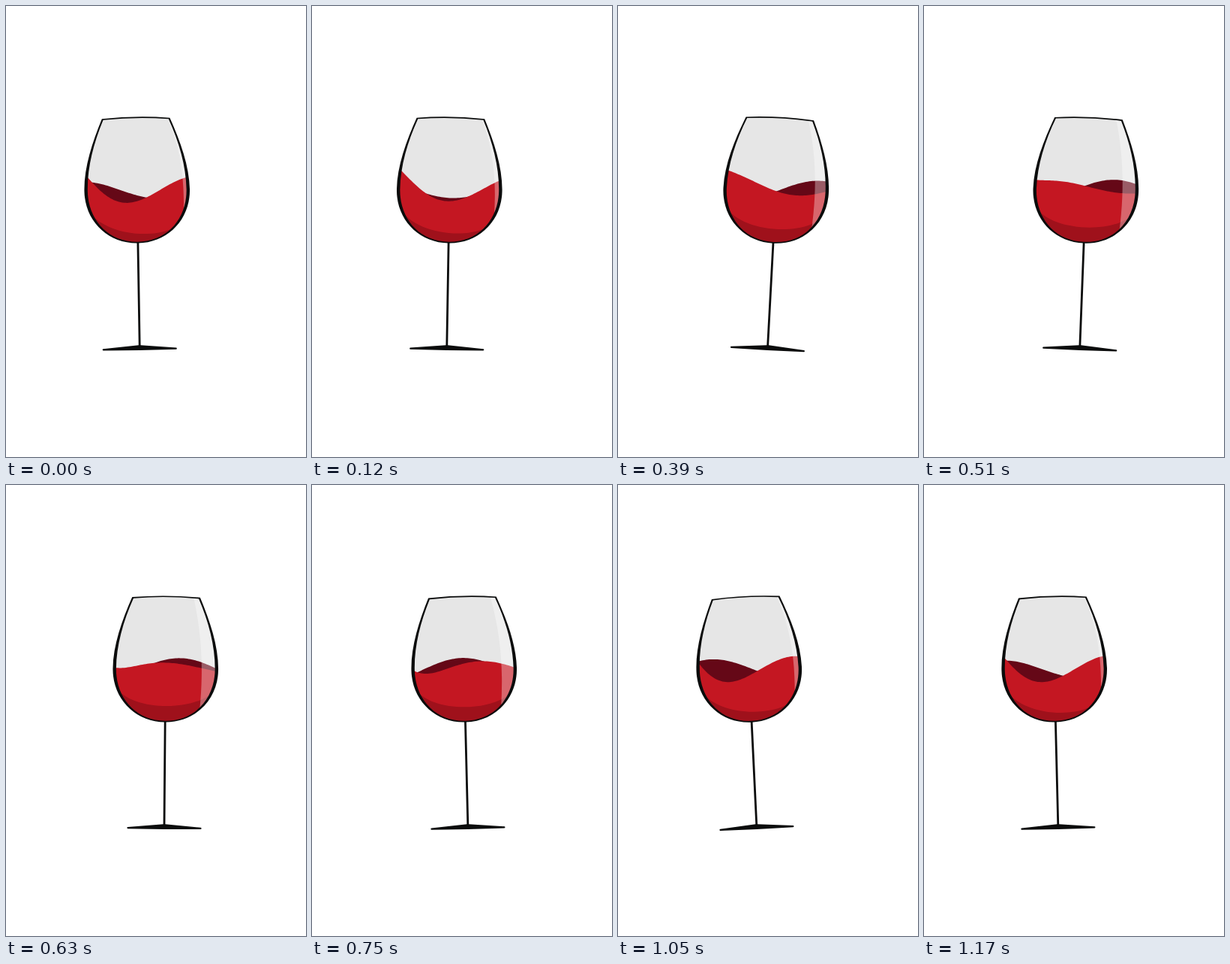
Animation of 400 by 600 pixels, one loop 1.2 s. Source, as an HTML page:

```html
<!DOCTYPE html>
<html lang="en">
<head>
<meta charset="utf-8">
<title>Swirling wine glass</title>
<style>
  html, body { margin: 0; width: 100%; height: 100%; overflow: hidden; background: #fff; }
  svg { display: block; width: 100vw; height: 100vh; }
</style>
</head>
<body>
<svg viewBox="0 0 400 600">
  <defs>
    <clipPath id="bowl">
      <path id="bowlClip" d="M-44.4-302.8Q0-306.6 44.4-302.8C58-272 68-239 68-208C68-169 40-138.5 0-138.5C-40-138.5-68-169-68-208C-68-239-58-272-44.4-302.8Z"/>
    </clipPath>
  </defs>
  <g clip-path="url(#bowl)">
    <rect width="400" height="600" fill="#e6e6e6"/>
    <path id="back" fill="#650817"/>
    <path id="front" fill="#c41722"/>
    <g id="tints">
      <path id="shade" fill="#9f111b"/>
      <path id="shine" fill="#fff" opacity=".34"/>
    </g>
  </g>
  <g id="glass" fill="#0b0c0c">
    <path fill-rule="evenodd" d="M-45.3-303.6Q0-307.6 45.3-303.6C58.8-272 70.3-239 70.3-208C70.3-168 40-137.5 0-137.5C-40-137.5-70.3-168-70.3-208C-70.3-239-58.8-272-45.3-303.6Z
      M-43.6-302Q0-305.8 43.6-302C57-271.5 65.9-239 65.9-208C65.9-170 40-139.3 0-139.3C-40-139.3-65.9-170-65.9-208C-65.9-239-57-271.5-43.6-302Z"/>
    <path d="M-1.4-138.5H1.4V-1.8L48.5 2.4A1.1 1.1 0 0 1 48.5 4.6L0 4.9L-48.5 4.6A1.1 1.1 0 0 1-48.5 2.4L-1.4-1.8Z"/>
  </g>
</svg>
<script>
const LOOP = 1200, STEP = 30, FOOT_Y = 453, GAP = 22;
const { PI, sin, cos } = Math;
const $ = id => document.getElementById(id);
const rad = deg => deg * PI / 180;
const phase = (t, start) => 2 * PI * (t - start) / LOOP;

// Surface height at u (-3 to 3 across the bowl): the near wave runs right, the far one left
function nearWave(u, p) {
  const rest = 248.2 - 2.1 * u - 1.6 * u ** 2 + 0.4 * u ** 3;
  const swing = 12 - 1.3 * u + 0.35 * u ** 2;
  const splash = ((3 - u) / 6) ** 6 * (2 + 3 * cos(p) + 3 * cos(2 * p));
  return rest + swing * cos(p - rad(18 + 46 * u)) + splash;
}

function farWave(u, p) {
  return 242.8 + 0.35 * u ** 2 + 12.7 * cos(p - rad(44 - 38 * u));
}

function liquid(wave, p, cx) {
  let d = `M${cx - 3.2 * GAP} 330`;
  for (let i = -32; i <= 32; i++) {
    const u = i / 10;
    d += `L${cx + u * GAP} ${wave(u, p)}`;
  }
  return d + "V330Z";
}

function draw(t) {
  const foot = 194.5 - 16.5 * cos(phase(t, 30));
  const tilt = 3.1 * sin(phase(t, 60));
  const cx = foot + 213 * sin(rad(tilt));
  const p = phase(t, 0), c = cos(p);

  const pose = `translate(${foot} ${FOOT_Y}) rotate(${tilt})`;
  for (const id of ["glass", "tints", "bowlClip"]) $(id).setAttribute("transform", pose);

  $("back").setAttribute("d", liquid(farWave, p, cx));
  $("front").setAttribute("d", liquid(nearWave, p, cx));

  $("shade").setAttribute("d",
    `M-66-184C-46 ${-148 + 3 * c} 45 ${-144 + 7 * c} 66 ${-177 + 5 * c}V-130H-66Z`);
  $("shine").setAttribute("d",
    `M${38.5 + 2.5 * c}-306C${56.1 + 7.6 * c}-253 ${57.2 + 6.8 * c}-205 ${53 + 7.2 * c}-154L${50 + 7 * c}-138H80V-306Z`);
}

function tick() {
  const t = performance.now() % LOOP;
  draw(Math.floor(t / STEP) * STEP);
  requestAnimationFrame(tick);
}
tick();
</script>
</body>
</html>
```
